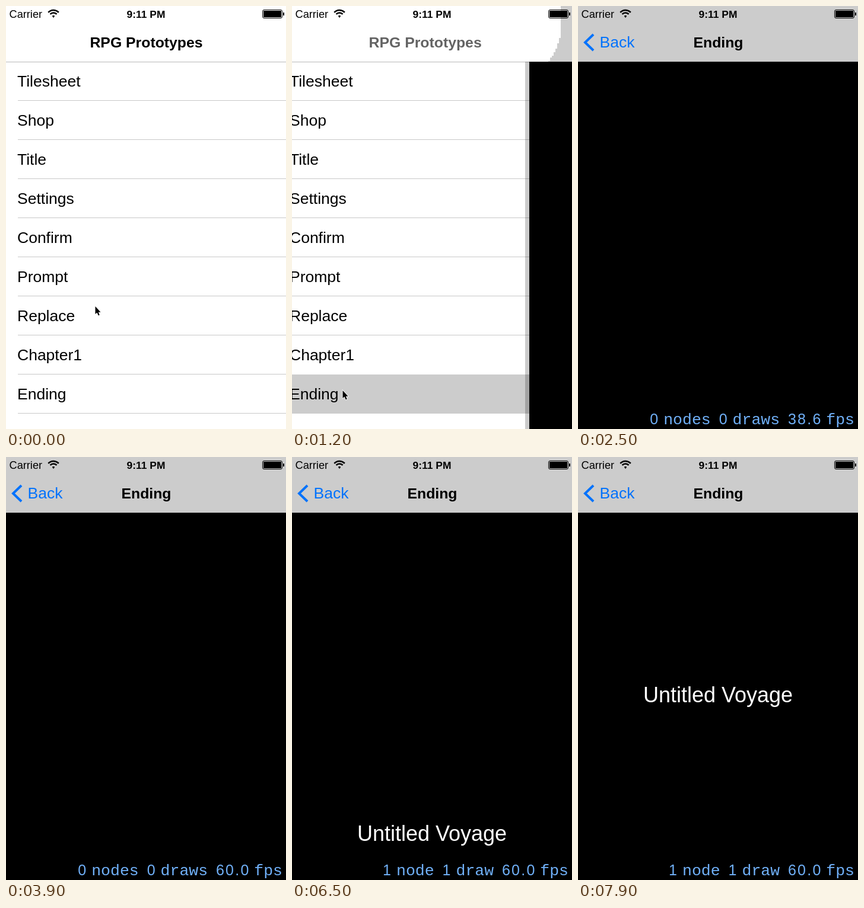
Write an HTML page with a canvas that moves like this. It is 472 px wide and 714 px high and loops after 8 s.

```html
<!DOCTYPE html>
<html lang="en">
<head>
<meta charset="utf-8">
<title>RPG Prototypes</title>
<style>
html, body { margin: 0; width: 472px; height: 714px; overflow: hidden; background: #fff; }
canvas { display: block; }
</style>
</head>
<body>
<canvas id="stage" width="472" height="714"></canvas>
<script>
const W = 472, H = 714, BAR = 94, ROW = 66, LOOP = 8000, STEP = 100;
const GRAY = '#ccc', BLUE = '#0072fc', STATS = '#70b0f8';
const SANS = '"Liberation Sans", Arial, sans-serif';
const MONO = '"Liberation Mono", "Courier New", monospace';
const rows = ['Tilesheet', 'Shop', 'Title', 'Settings', 'Confirm', 'Prompt', 'Replace', 'Chapter1', 'Ending'];
const PUSH = 1165, SELECT = 1000, CREDITS = 5800;
const c = document.getElementById('stage').getContext('2d');

const clamp = v => Math.max(0, Math.min(1, v));
const smooth = v => v * v * (3 - 2 * v);

function rect(x, y, w, h, color) {
  c.fillStyle = color;
  c.fillRect(x, y, w, h);
}

function text(str, x, y, font, color = '#000', align = 'left', alpha = 1) {
  c.globalAlpha = alpha;
  c.font = font;
  c.fillStyle = color;
  c.textAlign = align;
  c.fillText(str, x, y);
  c.globalAlpha = 1;
}

function line(points, width, color) {
  c.beginPath();
  points.forEach(([x, y]) => c.lineTo(x, y));
  c.lineWidth = width;
  c.strokeStyle = color;
  c.stroke();
}

// Critically damped spring
function pushAt(t) {
  const s = Math.max(0, t - PUSH) / 1000 * 19.7;
  return t > 1750 ? 1 : 1 - (1 + s) * Math.exp(-s);
}

function drawList(t, dx) {
  const selected = t >= SELECT ? rows.length - 1 : -1;
  rect(0, BAR, W, H - BAR, '#fff');
  rows.forEach((name, i) => {
    const y = BAR + i * ROW;
    if (i === selected) rect(0, y, W, ROW, GRAY);
    else if (i + 1 !== selected) rect(20 + dx, y + 65, W, 1, '#c8c8c8');
    text(name, 19 + dx, y + 42, '26.5px ' + SANS);
  });
}

// Characters run leftwards from the right edge
function drawStats(str, right) {
  let x = right;
  for (let i = str.length - 1; i >= 0; i--) {
    const ch = str[i];
    const w = ch === ' ' ? (/\d/.test(str[i - 1]) ? 8 : 13) : ch === '.' ? 9.5 : 15.9;
    x -= w;
    text(ch, x + w / 2, 706, /[\d.]/.test(ch) ? '25px ' + SANS : '26.5px ' + MONO, STATS, 'center');
  }
}

function drawScene(t, x) {
  rect(x - 7, BAR, 7, H - BAR, 'rgba(0,0,0,.2)');
  rect(x, BAR, W, H - BAR, '#000');
  const count = t < CREDITS ? '0 nodes 0 draws ' : '1 node 1 draw ';
  const fps = t < 1900 ? '0.0' : t < 2900 ? '38.6' : '60.0';
  drawStats(count + fps + ' fps', x + 466);
  if (t >= CREDITS) {
    text('Untitled Voyage', W / 2, 648 - (t - 6500) * 0.1671, '36px ' + SANS, '#fff', 'center');
  }
}

// The gray spreads from the right behind a stepped, rounded edge
function drawBar(t, p) {
  rect(0, 0, W, BAR, '#fff');
  if (t >= PUSH) {
    const u = (t - 1200) / 300, k = clamp(u);
    const edge = 453 - 60 * u - 60 * u * u;
    for (let y = 0; y < BAR; y += 3) {
      const inset = (21 + 16 * k) * Math.max(0, (y - 46) / 48) ** (1.4 + k);
      const x = Math.max(0, edge - Math.round(inset / 3) * 3);
      rect(x, y, W - x, Math.min(3, BAR - y), GRAY);
    }
  }
  rect(0, BAR, W, 1, 'rgba(0,0,0,.28)');

  const bold = 'bold 24.8px ' + SANS;
  const appear = clamp((p - 0.3) / 0.6);
  text('RPG Prototypes', 236.5 - 78 * p, 70, bold, '#000', 'center', clamp(1 - 2.55 * p));
  text('Ending', 236.5 + 70 * (1 - p), 70, bold, '#000', 'center', appear);
  text('Back', 36.5 + 78 * (1 - p), 70, '26.5px ' + SANS, BLUE, 'left', appear);
  c.globalAlpha = appear;
  line([[26, 48], [12, 61.5], [26, 75]], 4, BLUE);
  c.globalAlpha = 1;
}

function drawStatus() {
  text('Carrier', 5.5, 20, '18.2px ' + SANS);
  text('9:11 PM', W / 2, 20, 'bold 17.4px ' + SANS, '#000', 'center');
  c.strokeStyle = '#000';
  c.lineWidth = 2.5;
  for (const r of [3, 7.5, 12]) {
    c.beginPath();
    c.arc(80, 19, r, -Math.PI * 0.76, -Math.PI * 0.24);
    if (r === 3) {
      c.lineTo(80, 20);
      c.fillStyle = '#000';
      c.fill();
    } else c.stroke();
  }
  c.lineWidth = 1;
  c.beginPath();
  c.roundRect(432.5, 6.5, 33, 14, 2.5);
  c.stroke();
  rect(434, 8, 30, 11, '#000');
  rect(467, 11, 2, 5, '#000');
}

function drawCursor(t) {
  if (t >= 1900) return;
  const k = smooth(clamp((t - 50) / 850));
  const x = 150.5 - 65 * k - (t > 1400 ? 2 : 0), y = 507 + 142 * k;
  const shape = [[0, 0], [0, 13], [3, 10.5], [5.2, 15.5], [7.2, 14.6], [5.2, 9.8], [9, 9.8]];
  c.beginPath();
  shape.forEach(([a, b]) => c.lineTo(x + a, y + b));
  c.closePath();
  c.lineWidth = 1.5;
  c.strokeStyle = '#fff';
  c.stroke();
  c.fillStyle = '#000';
  c.fill();
}

function draw(t) {
  const p = pushAt(t);
  drawList(t, -Math.round(148 * p));
  if (t >= PUSH) drawScene(t, Math.round(W * (1 - p)));
  drawBar(t, p);
  drawStatus();
  drawCursor(t);
}

const start = performance.now();
function tick() {
  const t = (performance.now() - start) % LOOP;
  draw(Math.floor(t / STEP) * STEP);
  requestAnimationFrame(tick);
}
tick();
</script>
</body>
</html>
```
